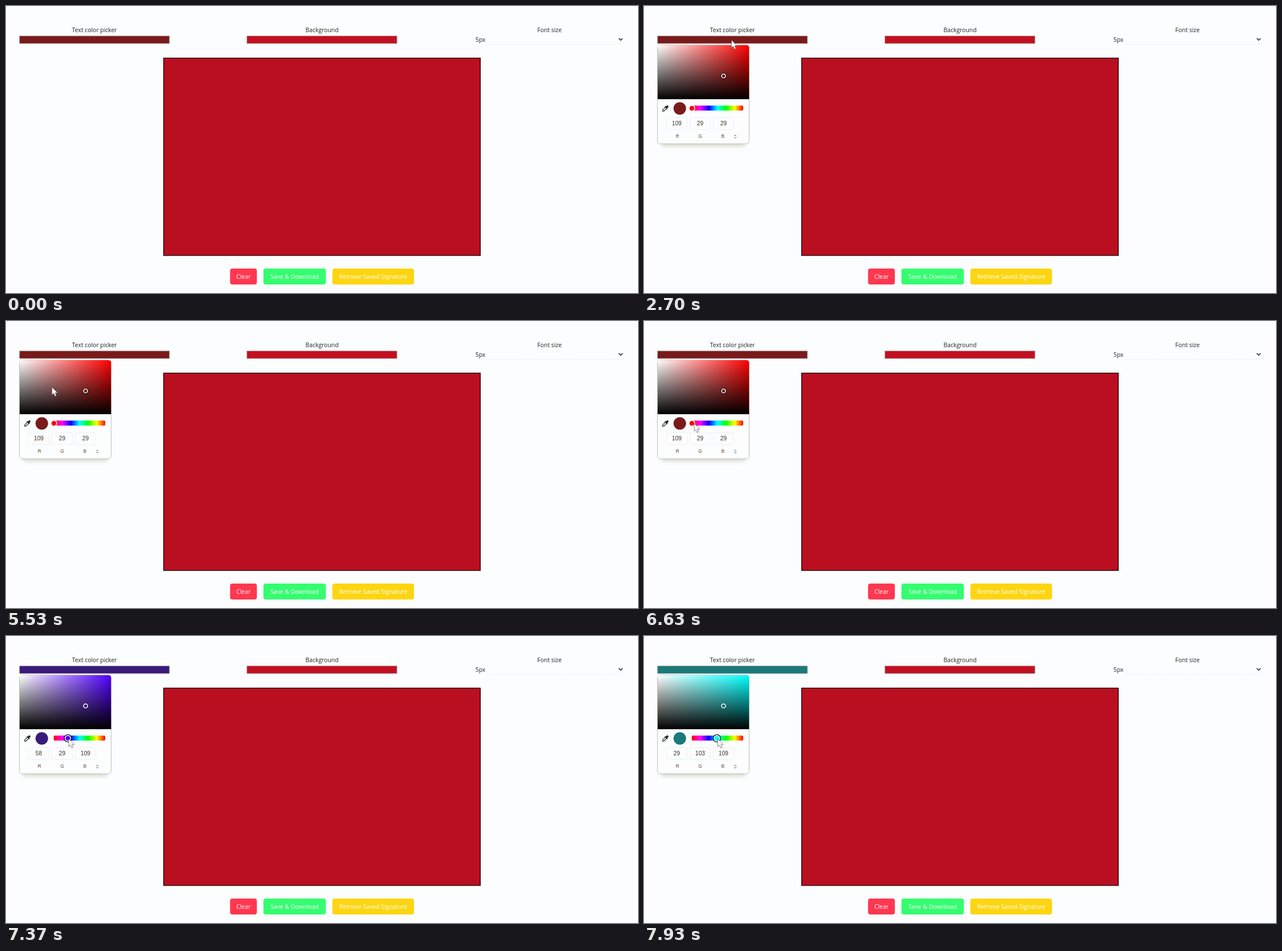
Write an HTML page that moves like this. It is 1109 by 505 pixels and loops after 8000 ms.

```html
<!DOCTYPE html>
<html lang="en">
<head>
<meta charset="utf-8">
<title>Signature pad</title>
<style>
  html, body { margin: 0; width: 100%; height: 100%; overflow: hidden; background: #fcfdfe; }
  svg { display: block; width: 1109px; height: 505px; }
  text { font: 10.4px "Open Sans", "Noto Sans", sans-serif; fill: #222; }
  .mid { text-anchor: middle; }
  .button text { fill: #fff; }
  .num { font: 10.2px "Liberation Sans", Arial, sans-serif; fill: #3b2f25; }
  .unit { font: 8.2px "Liberation Sans", Arial, sans-serif; fill: #5a4228; }
  .line { fill: none; stroke: #222; stroke-linecap: round; stroke-linejoin: round; }
  .swatch { stroke: #a39a9e; stroke-width: .8; }
</style>
</head>
<body>
<svg viewBox="0 0 1109 505">
  <defs>
    <linearGradient id="sat"><stop stop-color="#fff"/><stop id="pure" offset="1"/></linearGradient>
    <linearGradient id="val" x2="0" y2="1">
      <stop stop-color="#000" stop-opacity="0"/><stop offset="1" stop-color="#000"/>
    </linearGradient>
    <linearGradient id="rainbow"></linearGradient>
    <filter id="soft" x="-20%" y="-20%" width="140%" height="140%"><feGaussianBlur stdDeviation="3"/></filter>
    <path id="area" d="M24 164V73q0-4 4-4h152.3q4 0 4 4v91z"/>
  </defs>

  <text class="mid" x="155.2" y="46">Text color picker</text>
  <text class="mid" x="554.5" y="46">Background</text>
  <text class="mid" x="953.7" y="46">Font size</text>
  <rect id="ink" class="swatch" x="23.8" y="52.8" width="263" height="13.2"/>
  <rect class="swatch" x="422.8" y="52.8" width="263.2" height="13.2" fill="#c21021"/>
  <text x="823.7" y="63">5px</text>
  <path d="M842 67.5H1083" stroke="#eeeef3" stroke-dasharray="3 2"/>
  <path class="line" d="M1075.6 57.3l3 3 3-3" stroke-width="1.5"/>
  <rect x="276.6" y="91.6" width="555.7" height="347.4" fill="#ba0f20" stroke="#120709" stroke-width="1.3"/>
  <g id="buttons"></g>

  <g id="popup">
    <rect x="29" y="90" width="150" height="157" rx="6" fill="#8a8a66" opacity=".3" filter="url(#soft)"/>
    <rect x="23.5" y="68.7" width="161" height="173.8" rx="5" fill="#fcfdfe" stroke="#c2c1b3"/>
    <use href="#area" fill="url(#sat)"/>
    <use href="#area" fill="url(#val)"/>
    <circle id="areaRing" cx="139.6" cy="123" r="4.7" fill="none" stroke="#000" stroke-width="1.3"/>
    <circle cx="139.6" cy="123" r="3.6" fill="none" stroke="#fff" stroke-width="1.5"/>
    <g transform="translate(37.3 180.5) rotate(45)">
      <path d="M-1.8-6q0-1.2 1.8-1.2T1.8-6v3h1.4v1.6h-6.4V-3h1.4z" fill="#1d1d1d"/>
      <path class="line" d="M-1.5-1.4V4.8L0 6.6 1.5 4.8V-1.4" stroke-width="1.2"/>
    </g>
    <circle id="chip" cx="62.8" cy="180.3" r="11"/>
    <rect x="83.7" y="175.3" width="90.4" height="8.7" rx="2" fill="url(#rainbow)"/>
    <g id="thumb">
      <circle id="thumbRing" r="6.3" fill="none" stroke="#000" stroke-width="1.4"/>
      <circle id="thumbDot" r="5" stroke="#fff" stroke-width="1.4"/>
    </g>
    <g id="fields"></g>
    <path class="line" d="M158.7 228.6l1.5-1.5 1.5 1.5M158.7 231l1.5 1.5 1.5-1.5" stroke-width=".8"/>
  </g>

  <path id="cursor" d="M0 0V13.6L3 10.9 5.2 15.9 7.7 14.8 5.5 10H9.8z" fill="#fff" stroke="#555" stroke-width=".7"/>
</svg>
<script>
const LOOP = 8000, ENTER = 30, OPEN = 2700, PRESS = 6870;
const $ = id => document.getElementById(id);
const set = (id, attrs) => { for (const k in attrs) $(id).setAttribute(k, attrs[k]); };

// Smooth 0..1 progress between two times
function ease(t, from, to) {
  const p = Math.max(0, Math.min(1, (t - from) / (to - from)));
  return p * p * (3 - 2 * p);
}

// Cursor moves; swing bows the path sideways
const entry = { x: 1075, y: 4 };
const moves = [
  { from: ENTER, to: 1000, x: 153.5, y: 60 },
  { from: 3300, to: 4300, x: 32.3, y: 149 },
  { from: 4600, to: 4630, x: 55, y: 131 },
  { from: 4800, to: 5330, x: 35, y: 147, swing: 120 },
  { from: 5500, to: 5530, x: 80.7, y: 116.5 },
  { from: 5600, to: 5630, x: 101.5, y: 105 },
  { from: 6000, to: 6670, x: 85.5, y: 181, swing: 80 }
];

function cursorAt(t) {
  let { x, y } = entry;
  for (const m of moves) {
    const p = ease(t, m.from, m.to);
    x += (m.x - x) * p + (m.swing || 0) * Math.sin(Math.PI * p);
    y += (m.y - y) * p;
  }
  return { x, y };
}

function hsv(h, s, v) {
  return [5, 3, 1].map(n => {
    const k = (n + h / 60) % 6;
    return Math.round(255 * v * (1 - s * Math.max(0, Math.min(k, 4 - k, 1))));
  });
}
const css = (h, s = 1, v = 1) => `rgb(${hsv(h, s, v)})`;

$('buttons').innerHTML = [
  ['Clear', 393.2, 47, '#ff3850'],
  ['Save &amp; Download', 451.7, 109.6, '#35fd70'],
  ['Retrieve Saved Signature', 572.7, 143.2, '#fdd510']
].map(([label, x, w, fill]) => `<g class="button">
  <rect x="${x}" y="462" width="${w}" height="28" rx="4" fill="${fill}"/>
  <text class="mid" x="${x + w / 2}" y="480">${label}</text></g>`).join('');

$('fields').innerHTML = ['R', 'G', 'B'].map((name, i) => `
  <rect x="${39.5 + 41 * i}" y="196.5" width="36" height="21" rx="2" fill="none" stroke="#eeeff5"/>
  <text class="num mid" id="n${i}" x="${57.5 + 41 * i}" y="210"></text>
  <text class="unit mid" x="${58.8 + 39.8 * i}" y="232.4">${name}</text>`).join('');

$('rainbow').innerHTML = Array.from({ length: 7 }, (_, i) =>
  `<stop offset="${i / 6}" stop-color="${css(360 - 60 * i)}"/>`).join('');

function draw(t) {
  const drag = ease(t, 7020, 7670);
  const turn = 175.8 * drag;
  const tint = 360 - 180 * drag; // the painted hue runs slightly ahead of the readout
  const slide = turn / 4;
  const pressed = t >= PRESS;
  const shade = css(tint, .78, .475);
  const { x, y } = cursorAt(t);

  set('ink', { fill: shade });
  set('chip', { fill: shade });
  set('pure', { 'stop-color': css(tint) });
  set('thumbDot', { fill: css(tint) });
  set('thumb', { transform: `translate(${84 + slide} 180)` });
  set('thumbRing', { opacity: +pressed });
  set('areaRing', { opacity: +!pressed });
  hsv(360 - turn, 80 / 109, 109 / 255).forEach((v, i) => { $('n' + i).textContent = v; });

  set('popup', { visibility: t >= OPEN ? 'visible' : 'hidden' });
  set('cursor', {
    transform: `translate(${x + slide} ${y})`,
    visibility: t >= ENTER ? 'visible' : 'hidden'
  });
}

const start = performance.now();
function tick() {
  draw((performance.now() - start) % LOOP);
  requestAnimationFrame(tick);
}
tick();
</script>
</body>
</html>
```
